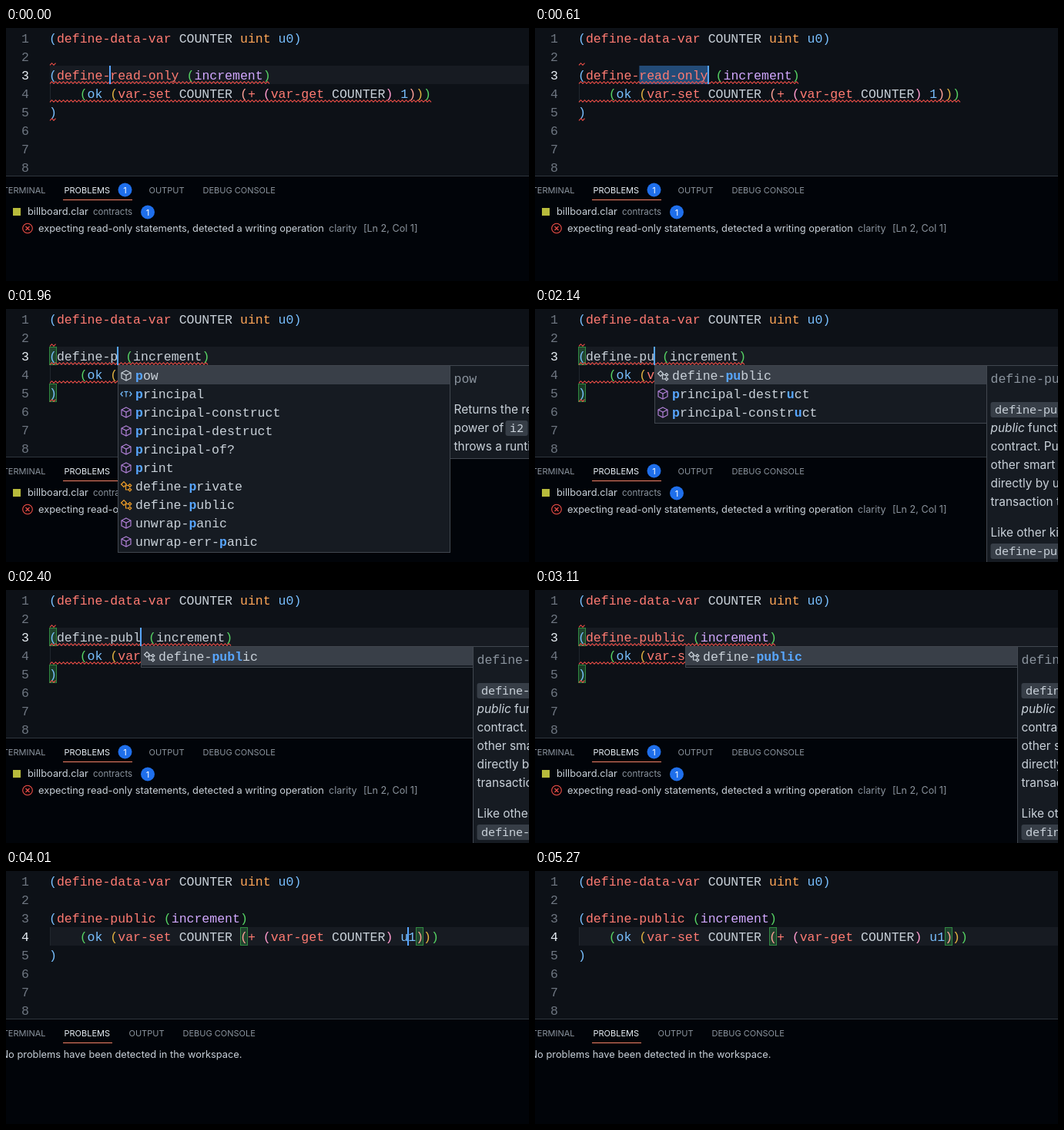
An HTML page with a canvas for the animation above (5.8 s loop, 679x329 px).

```html
<!DOCTYPE html>
<html lang="en">
<head>
<meta charset="utf-8">
<title>Editor: fixing a read-only function</title>
<style>
  html, body { margin: 0; width: 100%; height: 100%; overflow: hidden; background: #010409; }
  canvas { display: block; width: 679px; height: 329px; }
</style>
</head>
<body>
<canvas id="stage"></canvas>
<script>
const W = 679, H = 329, LOOP = 5800;
const canvas = document.getElementById('stage');
const dpr = window.devicePixelRatio || 1;
canvas.width = Math.round(W * dpr);
canvas.height = Math.round(H * dpr);
const ctx = canvas.getContext('2d');
ctx.scale(dpr, dpr);

const CODE = '16.53px "Liberation Mono", monospace';
const CHIP = '15px "Noto Sans Mono", monospace';
const sans = (size, style = '') => `${style} ${size}px Inter, sans-serif`;

const CHAR = 9.92, LEFT = 56, ROW = 24;
const C = {
  bg: '#0d1117', panel: '#010409', popup: '#161b22', border: '#30363d',
  text: '#c9d1d9', bright: '#e6edf3', dim: '#8b949e', number: '#6e7681',
  red: '#ff7b72', orange: '#ffa657', blue: '#79c0ff', purple: '#d2a8ff',
  error: '#f85149', match: '#58a6ff', badge: '#1f6feb', tab: '#f78166'
};
const PAREN = ['#79c0ff', '#56d364', '#e3b341', '#ffa198', '#ff9bce'];

const TYPING = [[1960, 'p'], [2140, 'pu'], [2310, 'pub'], [2400, 'publ'], [2580, 'publi'], [2660, 'public']];
const SELECT = 260, POPUP_END = 3650, FIXED = 4010;

// Square brackets mark the matched letters.
const ITEMS = {
  p: [
    ['cube', '[p]ow'], ['type', '[p]rincipal'], ['cube', '[p]rincipal-construct'],
    ['cube', '[p]rincipal-destruct'], ['cube', '[p]rincipal-of?'], ['cube', '[p]rint'],
    ['class', 'define-[p]rivate'], ['class', 'define-[p]ublic'],
    ['cube', 'unwrap-[p]anic'], ['cube', 'unwrap-err-[p]anic']
  ],
  pu: [
    ['class', 'define-[pu]blic'], ['cube', '[p]rincipal-destr[u]ct'], ['cube', '[p]rincipal-constr[u]ct']
  ]
};

const colX = col => LEFT + col * CHAR;
const rowY = row => 1 + (row - 1) * ROW;

function rect(x, y, w, h, color) {
  ctx.fillStyle = color;
  ctx.fillRect(x, y, w, h);
}

function text(str, x, y, color, font, align = 'left') {
  ctx.font = font;
  ctx.fillStyle = color;
  ctx.textAlign = align;
  ctx.fillText(str, x, y);
}

function path(points, close = false) {
  ctx.beginPath();
  points.forEach(([x, y], i) => i ? ctx.lineTo(x, y) : ctx.moveTo(x, y));
  if (close) ctx.closePath();
  ctx.stroke();
}

function circle(x, y, r) {
  ctx.beginPath();
  ctx.arc(x, y, r, 0, Math.PI * 2);
}

function codeLine(row, col, spans) {
  for (const [str, color] of spans) {
    text(str, colX(col), rowY(row) + 17.5, color, CODE);
    col += str.length;
  }
}

function squiggle(row, cols) {
  const y = rowY(row) + 22, end = colX(cols), points = [];
  for (let x = LEFT + 1, i = 0; x <= end; x += 2.5, i++) points.push([x, y + (i % 2 ? -1.3 : 1.3)]);
  ctx.strokeStyle = C.error;
  ctx.lineWidth = 1.1;
  path(points);
}

function bracketBox(row, col) {
  const x = Math.round(colX(col)), y = rowY(row);
  rect(x, y, 10, ROW, 'rgba(63,185,80,.25)');
  ctx.strokeStyle = 'rgba(63,185,80,.6)';
  ctx.lineWidth = 1;
  ctx.strokeRect(x + .5, y + .5, 9, ROW - 1);
}

function cursor(row, col) {
  rect(Math.round(colX(col) - 1), rowY(row), 2, ROW, C.match);
}

function cursorVisible(t) {
  const hidden = [[1150, 1600], [3110, POPUP_END], [4280, 4820], [5270, LOOP]];
  return !hidden.some(([from, to]) => t >= from && t < to);
}

function drawEditor(t, typed) {
  const fixed = t >= FIXED, onCall = t >= POPUP_END;
  const word = typed || 'read-only';
  const known = !typed || typed === 'public';
  const row = onCall ? 4 : 3;
  const selected = t < SELECT || typed ? 0 : t < 610 ? 4 : 9;

  rect(0, 0, W, 192, C.bg);
  if (selected) rect(colX(8), rowY(3), selected * CHAR, ROW, '#234b77');
  else rect(LEFT + 1, rowY(row), W, ROW, 'rgba(110,118,129,.1)');
  rect(LEFT + 1, rowY(4), 1, ROW, '#21262d');

  if (onCall) {
    bracketBox(4, 25);
    bracketBox(4, fixed ? 48 : 47);
  } else if (typed || (t >= 90 && t < 350)) {
    bracketBox(3, 0);
    bracketBox(5, 0);
  }

  for (let n = 1; n <= 8; n++) {
    text(n, 30, rowY(n) + 17.5, n === (fixed ? 4 : 3) ? C.bright : C.number, CODE, 'right');
  }

  codeLine(1, 0, [['(', PAREN[0]], ['define-data-var', C.red], [' COUNTER ', C.text],
    ['uint', C.orange], [' u0', C.blue], [')', PAREN[0]]]);
  codeLine(3, 0, [['(', PAREN[0]], ['define-' + word, known ? C.red : C.text], [' (', PAREN[1]],
    ['increment', known ? C.purple : C.text], [')', PAREN[1]]]);
  codeLine(4, 4, [['(', PAREN[1]], ['ok', C.blue], [' (', PAREN[2]], ['var-set', C.red],
    [' COUNTER ', C.text], ['(', PAREN[3]], ['+', C.red], [' (', PAREN[4]], ['var-get', C.red],
    [' COUNTER', C.text], [')', PAREN[4]], [fixed ? ' u1' : ' 1', C.blue],
    [')', PAREN[3]], [')', PAREN[2]], [')', PAREN[1]]]);
  codeLine(5, 0, [[')', PAREN[0]]]);

  if (!fixed) {
    squiggle(2, 1);
    squiggle(3, 20 + word.length);
    squiggle(4, 50);
    squiggle(5, 1);
  }

  if (cursorVisible(t)) {
    if (onCall) cursor(4, fixed ? 47 : 46);
    else cursor(3, 8 + (typed ? typed.length : selected));
  }
}

function badge(x, y) {
  circle(x, y, 9);
  ctx.fillStyle = C.badge;
  ctx.fill();
  text('1', x, y + 4, '#fff', sans(11), 'center');
}

function drawPanel(fixed) {
  rect(0, 192, W, H - 192, C.panel);
  rect(0, 192, W, 1, C.border);
  const shift = fixed ? 26 : 0, tab = sans(11);
  text('TERMINAL', 51.5, 214.8, C.dim, tab, 'right');
  text('PROBLEMS', 75.5, 214.8, C.bright, tab);
  text('OUTPUT', 185.5 - shift, 214.8, C.dim, tab);
  text('DEBUG CONSOLE', 255.5 - shift, 214.8, C.dim, tab);
  rect(74, 223, fixed ? 64 : 90, 1, C.tab);

  const body = sans(12.85), note = sans(12.6);
  if (fixed) {
    text('No problems have been detected in the workspace.', 306.5, 243, C.text, body, 'right');
    return;
  }
  badge(154.5, 210.5);
  rect(9, 234, 10, 10, '#b8bb3c');
  text('billboard.clar', 28, 243.3, C.text, body);
  text('contracts', 113, 243.3, C.dim, sans(11.5));
  badge(184, 239.5);

  ctx.strokeStyle = C.error;
  ctx.lineWidth = 1.1;
  circle(28, 260.5, 6.3);
  ctx.stroke();
  path([[25.5, 258], [30.5, 263]]);
  path([[30.5, 258], [25.5, 263]]);
  text('expecting read-only statements, detected a writing operation', 42, 265, C.text, body);
  text('clarity', 419, 265, C.dim, note);
  text('[Ln 2, Col 1]', 534.5, 265, C.dim, note, 'right');
}

function icon(kind, x, y, active) {
  const color = active ? C.text : { cube: '#b180d7', type: '#75beff', class: '#ee9d28' }[kind];
  ctx.strokeStyle = color;
  ctx.lineWidth = 1.2;
  if (kind === 'cube') {
    path([[x, y - 6.5], [x + 6, y - 3.5], [x + 6, y + 3.5], [x, y + 6.5], [x - 6, y + 3.5], [x - 6, y - 3.5]], true);
    path([[x - 6, y - 3.5], [x, y - .5], [x + 6, y - 3.5]]);
    path([[x, y - .5], [x, y + 6.5]]);
  } else if (kind === 'type') {
    path([[x - 4.5, y - 3], [x - 7, y], [x - 4.5, y + 3]]);
    path([[x + 4.5, y - 3], [x + 7, y], [x + 4.5, y + 3]]);
    path([[x - 2.5, y - 3], [x + 2.5, y - 3]]);
    path([[x, y - 3], [x, y + 4]]);
  } else {
    const diamond = (cx, cy, r) => path([[cx - r, cy], [cx, cy - r], [cx + r, cy], [cx, cy + r]], true);
    diamond(x - 3, y - 2.5, 3.4);
    diamond(x + 4.8, y - 1, 2);
    diamond(x + 4.8, y + 4.5, 2);
    path([[x, y - 1], [x + 2.8, y - 1]]);
    path([[x - .5, y - .5], [x - .5, y + 4.5], [x + 2.8, y + 4.5]]);
  }
}

function box(x, y, w, h) {
  rect(x, y, w, h, C.popup);
  ctx.strokeStyle = '#41474f';
  ctx.lineWidth = 1;
  ctx.strokeRect(x + .5, y + .5, w - 1, h - 1);
}

function chip(str, x, y) {
  ctx.font = CHIP;
  ctx.fillStyle = '#373e47';
  ctx.beginPath();
  ctx.roundRect(x, y - 15, ctx.measureText(str).width + 11, 20, 3);
  ctx.fill();
  text(str, x + 5.5, y, C.text, CHIP);
}

function drawDetails(x, typed) {
  const size = 15.4, font = sans(size), left = x + 5.5;
  const lines = (list, y) => list.forEach((s, i) => text(s, left, y + i * ROW, C.text, font));
  if (typed === 'p') {
    box(x, 73, W, 122);
    text('pow', left, 95.5, C.dim, CODE);
    lines(['Returns the result', 'power of', 'throws a runtime'], 136);
    chip('i2', left + 67, 160);
    return;
  }
  box(x, 73, W, H);
  text('define-public', left, 95.5, C.dim, CODE);
  chip('define-public', left, 136);
  text('public', left, 160, C.text, sans(size, 'italic'));
  const after = left + ctx.measureText('public').width;
  text(' functions', after, 160, C.text, font);
  lines(['contract. Public', 'other smart', 'directly by users', 'transaction to'], 184);
  lines(['Like other kinds'], 296);
  chip('define-public', left, 320);
}

function drawPopup(typed) {
  const items = ITEMS[typed] || [['class', `define-[${typed}]${'public'.slice(typed.length)}`]];
  const x = Math.round(colX(8 + typed.length));
  drawDetails(x + 431, typed);
  box(x, 73, 432, items.length * ROW + 4);
  rect(x + 1, 74, 430, ROW, '#393f48');
  items.forEach(([kind, name], i) => {
    const y = 74 + i * ROW;
    icon(kind, x + 11, y + 12.5, i === 0);
    let tx = x + 23;
    name.split(/[\[\]]/).forEach((part, k) => {
      text(part, tx, y + 17.5, k % 2 ? C.match : C.text, k % 2 ? 'bold ' + CODE : CODE);
      tx += part.length * CHAR;
    });
  });
}

function frame(now) {
  const t = now % LOOP;
  const typed = TYPING.reduce((word, [at, next]) => t >= at ? next : word, '');
  drawEditor(t, typed);
  drawPanel(t >= FIXED);
  if (typed && t < POPUP_END) drawPopup(typed);
}

const start = performance.now();
function tick() {
  frame(performance.now() - start);
  requestAnimationFrame(tick);
}
tick();
</script>
</body>
</html>
```
